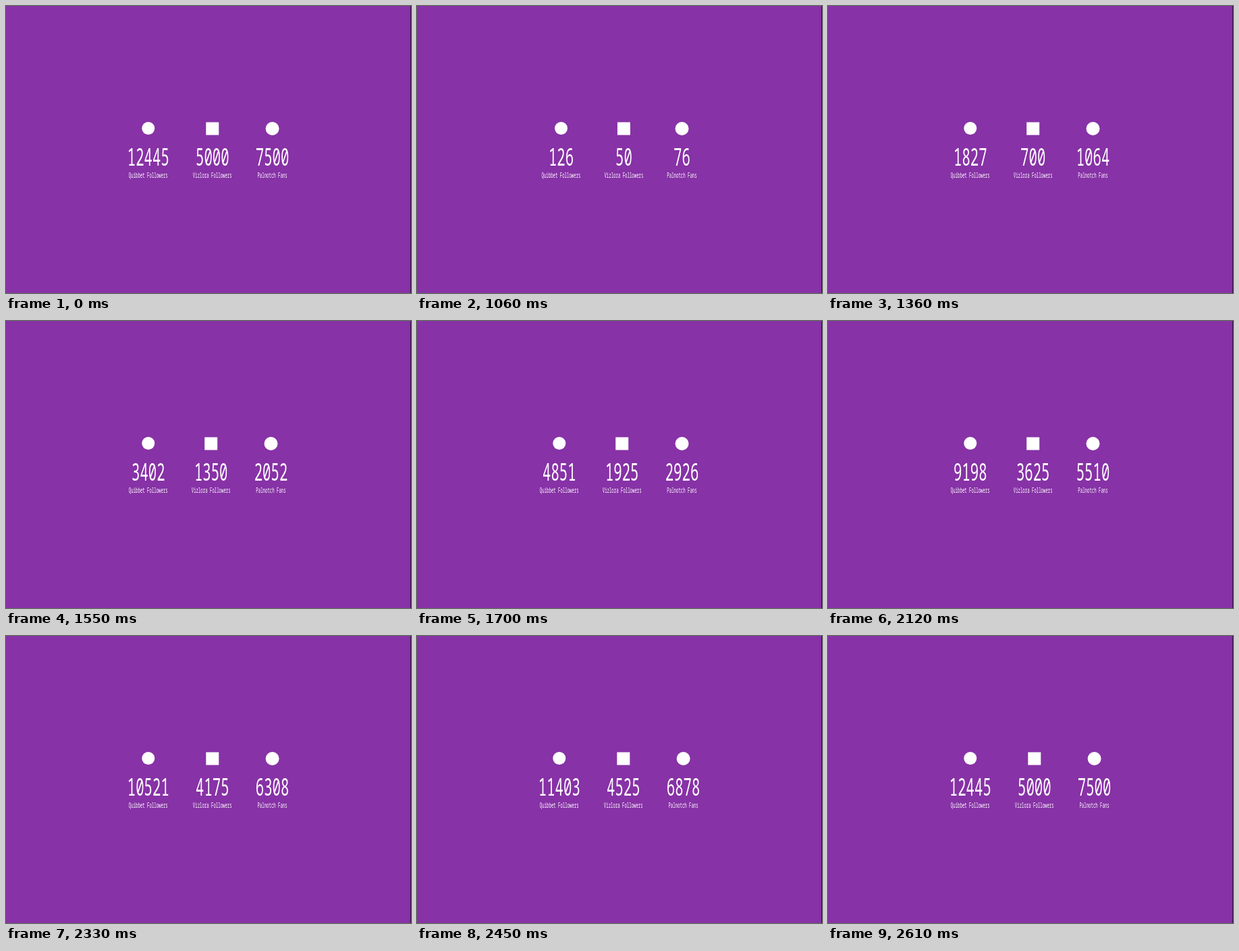
Recreate the animation shown at these times as an HTML page. Size 600 px wide and 426 px high, loop 2640 ms.

```html
<!DOCTYPE html>
<html lang="en">
<head>
<meta charset="utf-8">
<title>Follower counters</title>
<style>
  html, body { margin: 0; width: 100%; height: 100%; overflow: hidden; background: #8732a6; }
  svg { display: block; width: 600px; height: 426px; }
  text { font-family: "Noto Sans Mono", "DejaVu Sans Mono", monospace; text-anchor: middle; fill: #fff; }
  .count { font-size: 36px; }
  .label { font-size: 9.9px; }
</style>
</head>
<body>
<svg id="stage" viewBox="0 0 600 426">
  <rect width="600" height="426" fill="#8732a6"/>
  <rect x="599" width="1" height="426" fill="#2c0f38"/>
</svg>
<script>
const LOOP = 2640, TICK = 30;
const MID = 299.6, GAP = 35.1, SQUEEZE = 0.574;
const DIGIT = 12.4, LETTER = 3.4;

// lag: how far a counter trails the first one, in steps
const columns = [
  { label: "Quibbet Followers", goal: 12445, lag: 0, icon: ["circle", { cy: 181.5, r: 9.5 }] },
  { label: "Vizlora Followers", goal: 5000, lag: 0.2, icon: ["rect", { x: -9.5, y: 172.5, width: 19, height: 19 }] },
  { label: "Palnotch Fans", goal: 7500, lag: 0.3, icon: ["circle", { cy: 182, r: 10 }] }
];

// [time in ms, counter steps done]
const pace = [
  [1060, 2.6], [1180, 2.6], [1180, 4.4], [1360, 29.1], [1580, 60.4], [1700, 77.6],
  [2120, 146.1], [2180, 146.1], [2180, 150.4], [2330, 167.25], [2610, 201]
];

function add(parent, tag, attrs, text = "") {
  const el = document.createElementNS("http://www.w3.org/2000/svg", tag);
  for (const key in attrs) el.setAttribute(key, attrs[key]);
  el.textContent = text;
  return parent.appendChild(el);
}

for (const col of columns) {
  col.group = add(document.getElementById("stage"), "g", {});
  add(col.group, col.icon[0], { ...col.icon[1], fill: "#fff" });
  const squeeze = add(col.group, "g", { transform: `scale(${SQUEEZE} 1)` });
  col.count = add(squeeze, "text", { class: "count", y: 237.5 });
  add(squeeze, "text", { class: "label", y: 255.5 }, col.label);
  col.step = Math.ceil(col.goal / 200);
}

function stepsAt(t) {
  const last = pace.length - 1;
  if (t < pace[0][0] || t >= pace[last][0]) return pace[last][1];
  let i = last - 1;
  while (pace[i][0] > t) i--;
  const [t0, s0] = pace[i], [t1, s1] = pace[i + 1];
  const ticks = Math.floor((t1 - t0) / TICK) - 1;
  const passed = Math.min(ticks, Math.floor((t - t0) / TICK)) * TICK;
  return s0 + (s1 - s0) * passed / (t1 - t0);
}

function render(t) {
  const steps = stepsAt(t);
  let total = GAP * (columns.length - 1);
  for (const col of columns) {
    const value = String(Math.min(col.goal, Math.floor(steps - col.lag) * col.step));
    col.count.textContent = value;
    col.width = Math.max(value.length * DIGIT, col.label.length * LETTER);
    total += col.width;
  }
  let x = MID - total / 2;
  for (const col of columns) {
    col.group.setAttribute("transform", `translate(${x + col.width / 2} 0)`);
    x += col.width + GAP;
  }
}

const start = performance.now();
function frame() {
  render((performance.now() - start) % LOOP);
  requestAnimationFrame(frame);
}
frame();
</script>
</body>
</html>
```
